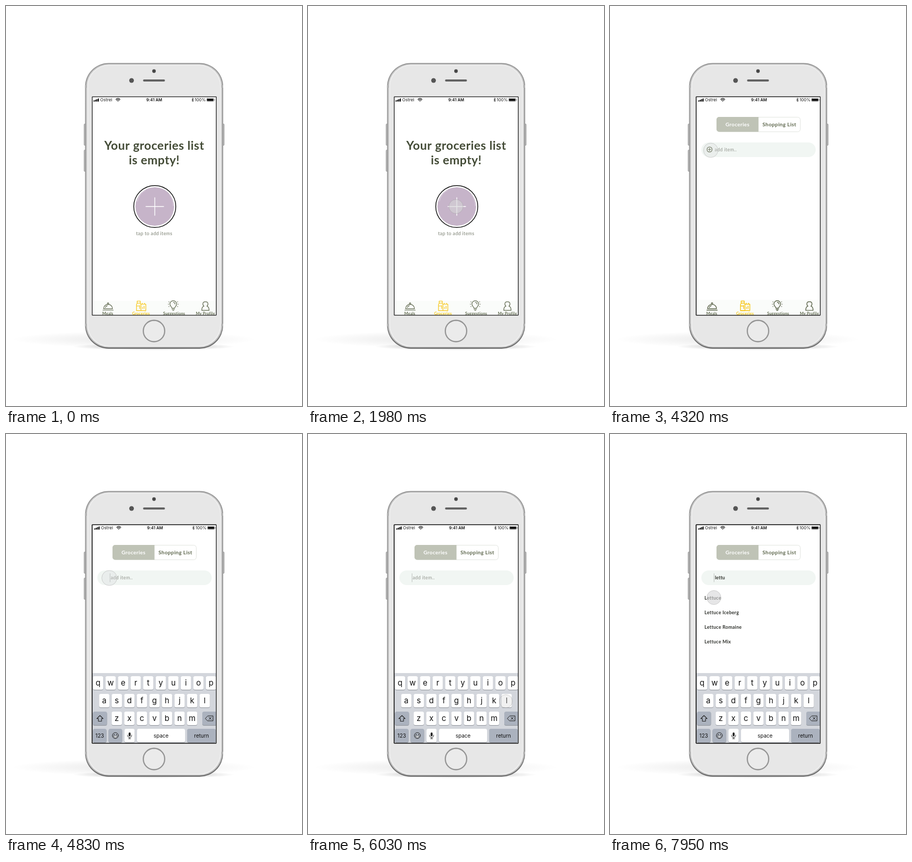
An HTML page with a canvas that plays this animation: 567x768 px, repeating every 8000 ms.

```html
<!DOCTYPE html>
<html lang="en">
<head>
<meta charset="utf-8">
<title>Groceries list</title>
<style>
html, body { margin: 0; width: 100%; height: 100%; overflow: hidden; background: #fff; }
canvas { display: block; width: 567px; height: 768px; }
</style>
</head>
<body>
<canvas id="stage"></canvas>
<script>
const W = 567, H = 768, LOOP = 8000;
const OLIVE = '#434b36', SAGE = '#5f684e', YELLOW = '#f7c40f';
const LATO = 'Lato, "Open Sans", sans-serif', INTER = 'Inter, Roboto, sans-serif';
const dpr = window.devicePixelRatio || 1;

function layer(canvas = document.createElement('canvas')) {
  canvas.width = W * dpr;
  canvas.height = H * dpr;
  const c = canvas.getContext('2d');
  c.scale(dpr, dpr);
  return c;
}

function box(c, x, y, w, h, r, fill, stroke, lw = 1) {
  c.beginPath();
  c.roundRect(x, y, w, h, r);
  if (fill) { c.fillStyle = fill; c.fill(); }
  if (stroke) { c.strokeStyle = stroke; c.lineWidth = lw; c.stroke(); }
}

function disc(c, x, y, r, fill, stroke, lw = 1) {
  c.beginPath();
  c.arc(x, y, r, 0, Math.PI * 2);
  if (fill) { c.fillStyle = fill; c.fill(); }
  if (stroke) { c.strokeStyle = stroke; c.lineWidth = lw; c.stroke(); }
}

function path(c, d, stroke, lw = 1, fill) {
  const p = new Path2D(d);
  if (fill) { c.fillStyle = fill; c.fill(p); }
  if (stroke) {
    c.strokeStyle = stroke;
    c.lineWidth = lw;
    c.lineCap = c.lineJoin = 'round';
    c.stroke(p);
  }
}

function text(c, str, x, y, font, color, align = 'left', spacing = 0) {
  c.font = font;
  c.fillStyle = color;
  c.textAlign = align;
  c.letterSpacing = spacing + 'px';
  c.fillText(str, x, y);
}

function shadow(c, x, y, rx, ry, dark) {
  c.save();
  c.translate(x, y);
  c.scale(1, ry / rx);
  const shade = c.createRadialGradient(0, 0, 0, 0, 0, rx);
  shade.addColorStop(0, `rgba(0,0,0,${dark})`);
  shade.addColorStop(0.55, `rgba(0,0,0,${dark * 0.5})`);
  shade.addColorStop(1, 'rgba(0,0,0,0)');
  disc(c, 0, 0, rx, shade);
  c.restore();
}

function drawPhone(c) {
  c.fillStyle = '#fff';
  c.fillRect(0, 0, W, H);
  shadow(c, 245, 640, 235, 16, 0.09);
  shadow(c, 283, 654, 155, 7, 0.3);

  for (const [x, y] of [[149.5, 226.5], [149.5, 276.5], [414.5, 226.5]])
    box(c, x, y, 3.5, 41, 1.2, '#bdbdbd', '#8a8a8a', 0.7);

  const rim = c.createLinearGradient(0, 109, 0, 659);
  rim.addColorStop(0, '#8e8e8e');
  rim.addColorStop(0.9, '#858585');
  rim.addColorStop(1, '#686868');
  box(c, 151.5, 109.5, 264.5, 548.5, 45, rim);
  box(c, 152.8, 111, 261.9, 544.8, 43.7, '#bcbcbc');
  box(c, 154.6, 112.2, 258.3, 542.3, 42.4, '#dedede');
  box(c, 156, 113, 255.5, 540.8, 41.4, '#f2f2f2');
  box(c, 157.2, 114.2, 253.1, 538.2, 40.4, '#e7e7e7');
  c.fillStyle = '#b3b3b3';
  for (const x of [151.5, 412.5])
    for (const y of [152, 610]) c.fillRect(x, y, 3.5, 5);

  disc(c, 283.5, 125, 3.4, '#474747');
  disc(c, 240.5, 143, 4.5, '#555');
  box(c, 262.5, 141, 42, 4, 2, '#636363');
  disc(c, 283.5, 624, 20.5, '#ebebeb', '#949494', 2.3);
}

function statusBar(c, dx) {
  c.save();
  c.translate(dx, 0);
  const ink = '#111';
  for (let i = 0; i < 4; i++) box(c, 167.5 + i * 2.8, 181.2 - i * 1.2, 2.1, 2.3 + i * 1.2, 0.5, ink);
  text(c, 'Ostrel', 180.5, 183, '400 8px ' + INTER, ink, 'left', 0.1);
  path(c, 'M210.5 179.2Q214.5 175.4 218.5 179.2M212 181Q214.5 178.8 217 181', ink, 1.2);
  disc(c, 214.5, 182.6, 0.9, ink);
  text(c, '9:41 AM', 284, 183, '600 7.7px ' + INTER, ink, 'center', 0.05);
  path(c, 'M355.8 178.6L359.4 181.9L357.6 183.7V176.7L359.4 178.5L355.8 181.9', ink, 0.75);
  text(c, '100%', 361.5, 183, '400 8px ' + INTER, ink);
  box(c, 384.2, 177.2, 14, 6, 1.5, null, '#777', 0.6);
  box(c, 385, 178, 12.4, 4.4, 0.8, ink);
  box(c, 399, 179, 1, 2.4, 0.5, '#777');
  c.restore();
}

function tabBar(c, top, lw) {
  c.fillStyle = '#fafcfa';
  c.fillRect(165, top, 238, 594 - top);
  path(c, 'M185.5 584H205.5M187 581.3C187 570 204 570 204 581.3ZM190.3 579Q191.3 576 194 575.3', SAGE, lw);
  disc(c, 195.5, 571.2, 1.4, null, SAGE, lw);
  path(c, 'M250 585V573.5L251.3 570.5H257.2L258.5 573V585ZM251.3 570.5V566.5H257.2V570.5M250 576H256M258.5 572.5H267.8V584.8H250M256 575V581M261 572.5V570.5M265.5 572.5V570.5M261.5 578.5V581M264.5 576V581', YELLOW, lw);
  path(c, 'M317.8 580.3C317.8 577.3 314 576.5 314 572.2A6.4 6.4 0 0 1 326.8 572.2C326.8 576.5 323 577.3 323 580.3ZM318 582.5H322.8M319.2 584.5H321.6M320.4 569A3.3 3.3 0 0 1 323.7 572.3', SAGE, lw);
  for (const side of [-1, 1])
    for (const [x, y] of [[8.2, 568], [9.2, 572.5], [8.2, 577]]) {
      c.fillStyle = SAGE;
      c.fillRect(320.4 + side * x - 0.7, y - 0.6, 1.5, 1.2);
    }
  path(c, 'M382 567.8C389 567.8 387 575 384.8 576.3C388.5 577 389 580 389 584.4H375C375 580 375.5 577 379.2 576.3C377 575 375 567.8 382 567.8Z', SAGE, lw);
  const tabs = [['Meals', 195], ['Groceries', 258.5], ['Suggestions', 322], ['My Profile', 382]];
  for (const [name, x] of tabs)
    text(c, name, x, 593, '700 7.5px ' + LATO, name === 'Groceries' ? YELLOW : SAGE, 'center', 0.2);
}

function emptyPage(c) {
  statusBar(c, 0);
  const title = '700 23px ' + LATO;
  text(c, 'Your groceries list', 284, 276, title, OLIVE, 'center', 0.5);
  text(c, 'is empty!', 284, 304, title, OLIVE, 'center', 0.5);
  disc(c, 285, 385, 40.3, '#fff', '#111', 1.5);
  disc(c, 285, 385, 37, '#c6b4c9');
  path(c, 'M313.5 362Q321 371 320.5 384M251.5 375Q255 360 267 354', 'rgba(255,255,255,.65)', 0.7);
  path(c, 'M268 385H302M285 368V402', '#fff', 1.4);
  text(c, 'tap to add items', 284, 440, '400 9px ' + LATO, '#7b8072', 'center', 0.35);
  tabBar(c, 566, 1.2);
}

function listHead(c) {
  statusBar(c, 1.5);
  box(c, 204.5, 213.5, 160, 28, 5, '#fff', '#e2e5df');
  box(c, 204, 213, 80.5, 28.5, [5, 0, 0, 5], '#bfc3b6');
  text(c, 'Groceries', 244.3, 230.5, '700 10px ' + LATO, '#fff', 'center', 0.38);
  text(c, 'Shopping List', 324.5, 230.5, '700 10px ' + LATO, SAGE, 'center', 0.38);
  box(c, 175, 262, 219, 28, 14, '#f1f6f3');
}

const hint = c => text(c, 'add item..', 200.5, 278.7, '400 9px ' + LATO, '#92958e', 'left', 0.35);

function listPage(c) {
  listHead(c);
  disc(c, 190.7, 275.5, 4.9, null, SAGE, 1.2);
  path(c, 'M188 275.5H193.4M190.7 272.8V278.2', SAGE, 1.2);
  hint(c);
  tabBar(c, 564, 1.4);
}

function key(c, x, y, w, label, size = 15, fill = '#fff') {
  box(c, x, y + 1, w, 26, 3.5, '#8f939a');
  box(c, x, y, w, 26, 3.5, fill);
  if (label) text(c, label, x + w / 2, y + (size > 12 ? 17.5 : 16.5), `400 ${size}px ${INTER}`, '#111', 'center');
}

function keyboard(c) {
  const dark = '#abb2be', ink = '#222', pitch = 24.05;
  c.fillStyle = '#d3d6dc';
  c.fillRect(165, 459, 238, 135);
  [['qwertyuiop', 176.3], ['asdfghjkl', 188.2], ['zxcvbnm', 212.2]].forEach(([row, x], r) =>
    [...row].forEach((ch, i) => key(c, x + i * pitch - 9.9, 465 + r * 34, 19.8, ch)));
  key(c, 166.5, 533, 27, '', 0, dark);
  key(c, 376, 533, 28, '', 0, dark);
  path(c, 'M180 540.5L186 546.5H183V551.5H177V546.5H174Z', ink, 1.1);
  path(c, 'M382 546L386.5 541.2H396.5V550.8H386.5ZM388.7 543.6L393.4 548.4M393.4 543.6L388.7 548.4', ink, 1);
  key(c, 166.5, 566, 26, '123', 10, dark);
  key(c, 196.5, 566, 26, '', 0, dark);
  key(c, 227, 566, 19.5, '');
  key(c, 251, 566, 92, 'space', 10);
  key(c, 347, 566, 55, 'return', 10, dark);
  disc(c, 209.5, 579, 5.7, null, ink, 1);
  disc(c, 207.3, 577, 0.9, ink);
  disc(c, 211.7, 577, 0.9, ink);
  path(c, 'M205.8 579.8H213.2Q212.5 583.2 209.5 583.2Q206.5 583.2 205.8 579.8Z', ink, 0.6, '#e8eaee');
  box(c, 234.9, 573, 3.8, 7.5, 1.9, ink);
  path(c, 'M232.9 578V579A3.9 3.7 0 0 0 240.7 579V578M236.8 582.7V585M234.6 585H239', ink, 0.9);
}

function caret(c) {
  path(c, 'M199.3 268V284', '#bcc0bc', 1);
}

function typingPage(c) {
  listHead(c);
  hint(c);
  caret(c);
  keyboard(c);
}

function resultsPage(c) {
  listHead(c);
  caret(c);
  text(c, 'lettu', 201, 278.7, '700 9px ' + LATO, '#30322d', 'left', 0.1);
  ['Lettuce', 'Lettuce Iceberg', 'Lettuce Romaine', 'Lettuce Mix'].forEach((item, i) =>
    text(c, item, 181, 318 + i * 28, '700 9px ' + LATO, '#30322d', 'left', 0.28));
  keyboard(c);
}

function page(draw) {
  const c = layer();
  c.beginPath();
  c.rect(164, 173, 240, 422);
  c.clip();
  c.fillStyle = '#fff';
  c.fillRect(165, 174, 238, 420);
  draw(c);
  // Hide what overhangs the right edge of the screen
  c.fillStyle = '#e7e7e7';
  c.fillRect(403, 173, 1, 422);
  c.strokeStyle = '#1c1c1c';
  c.lineWidth = 1.3;
  c.strokeRect(165.2, 174.4, 237.5, 419.2);
  return c.canvas;
}

const ctx = layer(document.getElementById('stage'));

const clamp = v => Math.min(1, Math.max(0, v));
const span = (t, a, b) => clamp((t - a) / (b - a));
const lerp = (a, b, p) => a + (b - a) * p;
const linear = p => p;
const smooth = p => p * p * (3 - 2 * p);
const bez = (a, b, c, d, p) => {
  const q = 1 - p;
  return q * q * q * a + 3 * q * q * p * b + 3 * q * p * p * c + p * p * p * d;
};

// Dissolves into the next page: start, end
const fades = [[2250, 2670], [4340, 4650], [6040, 6240]];

// Pointer moves: start, end, bezier x, bezier y, easing
const moves = [
  [590, 1410, [367, 345, 283, 283.5], [193, 255, 402, 385], smooth],
  [3090, 3880, [283.5, 262, 212, 193], [385, 355, 287, 277], smooth],
  [4800, 5950, [193, 255, 317, 379], [277, 262, 288, 513], linear],
  [6660, 7450, [379, 330, 212, 199], [513, 455, 318, 314], smooth]
];
moves[2][3][2] = 550;

// Pointer presses: start, end
const taps = [[1960, 2250], [4120, 4350], [5950, 6110], [7930, 8200]];

function pointer(t) {
  const i = moves.findLastIndex(m => t >= m[0]);
  const [a, b, xs, ys, ease] = moves[i];
  const p = ease(span(t, a, b));
  const press = span(t, ...taps[i]);
  const settle = 1 - (1 - press) ** 2;
  const from = i ? 0.24 : 0.65;
  return {
    x: bez(...xs, p),
    y: bez(...ys, p),
    r: lerp(lerp(15, 14.4, p), 15, press) - 1.6 * Math.sin(Math.PI * press),
    alpha: press ? lerp(0.65, 0.24, settle) : lerp(from, 0.65, p)
  };
}

function drawPointer(t) {
  if (t < 600) return;
  const { x, y, r, alpha } = pointer(t);
  ctx.globalAlpha = span(t, 570, 700);
  disc(ctx, x, y, r - 0.5, `rgba(213,213,214,${alpha})`, 'rgba(150,150,150,.42)', 0.9);
  ctx.globalAlpha = 1;
}

const phone = layer();
drawPhone(phone);
const pages = [emptyPage, listPage, typingPage, resultsPage].map(page);

function frame(t) {
  ctx.drawImage(phone.canvas, 0, 0, W, H);
  ctx.drawImage(pages[0], 0, 0, W, H);
  fades.forEach(([a, b], i) => {
    ctx.globalAlpha = span(t, a, b);
    ctx.drawImage(pages[i + 1], 0, 0, W, H);
  });
  ctx.globalAlpha = 1;
  drawPointer(t);
}

const begin = performance.now();
function tick() {
  frame((performance.now() - begin) % LOOP);
  requestAnimationFrame(tick);
}
tick();
</script>
</body>
</html>
```
